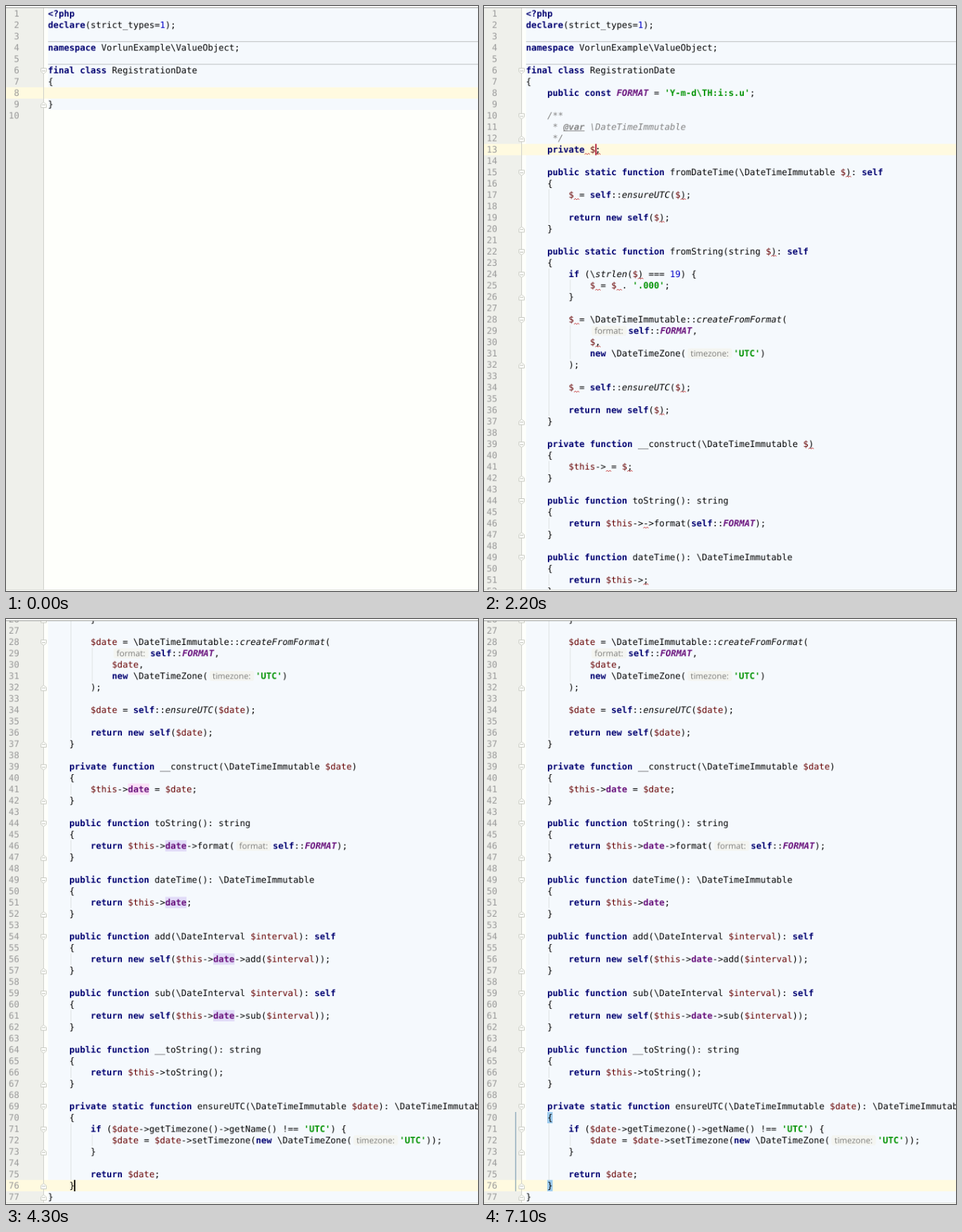
Recreate the animation shown at these times as an HTML page with a canvas. Size 672 by 833 pixels, loop 7200 ms.

```html
<!DOCTYPE html>
<html lang="en">
<head>
<meta charset="utf-8">
<title>Code template</title>
<style>
html, body { margin: 0; width: 100%; height: 100%; overflow: hidden; background: #fefffb; }
canvas { display: block; width: 672px; height: 833px; }
</style>
</head>
<body>
<canvas id="stage" width="672" height="833"></canvas>
<script>
// The editor is laid out on a whole-pixel grid and shown slightly reduced
const W = 709, H = 879, SCALE = .9486, LOOP = 7200;
const SIZE = 13.29, CHAR = 8, LINE = 17, BASE = 13, TOP = 3, LEFT = 63, SCROLL = 436;
const MONO = '"DejaVu Sans Mono", monospace';
const SANS = '"Open Sans", sans-serif';
const stage = document.getElementById('stage').getContext('2d');
const screen2x = document.createElement('canvas');
screen2x.width = W;
screen2x.height = H;
const ctx = screen2x.getContext('2d');

// ~ stands for the template variable, «...» for an inlay hint
const head = String.raw`<?php
declare(strict_types=1);

namespace VorlunExample\ValueObject;

final class RegistrationDate
{`.split('\n');

const full = head.concat(String.raw`    public const FORMAT = 'Y-m-d\TH:i:s.u';

    /**
     * @var \DateTimeImmutable
     */
    private $~;

    public static function fromDateTime(\DateTimeImmutable $~): self
    {
        $~ = self::ensureUTC($~);

        return new self($~);
    }

    public static function fromString(string $~): self
    {
        if (\strlen($~) === 19) {
            $~ = $~ . '.000';
        }

        $~ = \DateTimeImmutable::createFromFormat(
            «format:»self::FORMAT,
            $~,
            new \DateTimeZone(«timezone:»'UTC')
        );

        $~ = self::ensureUTC($~);

        return new self($~);
    }

    private function __construct(\DateTimeImmutable $~)
    {
        $this->~ = $~;
    }

    public function toString(): string
    {
        return $this->~->format(«format:»self::FORMAT);
    }

    public function dateTime(): \DateTimeImmutable
    {
        return $this->~;
    }

    public function add(\DateInterval $interval): self
    {
        return new self($this->~->add($interval));
    }

    public function sub(\DateInterval $interval): self
    {
        return new self($this->~->sub($interval));
    }

    public function __toString(): string
    {
        return $this->toString();
    }

    private static function ensureUTC(\DateTimeImmutable $~): \DateTimeImmutable
    {
        if ($~->getTimezone()->getName() !== 'UTC') {
            $~ = $~->setTimezone(new \DateTimeZone(«timezone:»'UTC'));
        }

        return $~;
    }
}
`.split('\n'));

const items = [
  ['collection', 'Collection'], ['bool', 'Bool'], ['float', 'Float'], ['int', 'Int'],
  ['string', 'String'], ['array', 'Array'], ['datetime', 'DateTimeImmutable'], ['uuid', 'UUID']
];

const styles = {
  plain: ['', '#000'],
  keyword: ['bold', '#000070'],
  string: ['bold', '#009200'],
  number: ['', '#0000c8'],
  variable: ['', '#660000'],
  field: ['bold', '#660e7a'],
  constant: ['italic bold', '#660e7a'],
  call: ['italic', '#000'],
  comment: ['italic', '#808080'],
  tag: ['italic bold', '#808080']
};

const rules = new RegExp([
  /(?<hint>«[^»]+»)/, /(?<string>'[^']*')/, /(?<tilde>\$~)/, /(?<field>~)/, /(?<variable>\$\w+)/,
  /(?<keyword><\?php|\b(?:declare|namespace|final|class|public|private|const|static|function|return|new|if|self)\b)/,
  /(?<call>(?<=::|\\)(?:ensureUTC|createFromFormat|strlen))/,
  /(?<constant>\bFORMAT\b)/, /(?<number>\b\d+\b)/
].map(r => r.source).join('|'), 'g');

function tokenize(line) {
  if (/^\s*\/?\*/.test(line)) {
    return line.split(/(@var)/).map(s => [s === '@var' ? 'tag' : 'comment', s]);
  }
  const out = [];
  let end = 0;
  for (const m of line.matchAll(rules)) {
    if (m.index > end) out.push(['plain', line.slice(end, m.index)]);
    out.push([Object.keys(m.groups).find(k => m.groups[k] !== undefined), m[0]]);
    end = m.index + m[0].length;
  }
  if (end < line.length) out.push(['plain', line.slice(end)]);
  return out;
}

// Number of edges passed at time t
const passed = (t, edges) => edges.filter(e => t >= e).length;
const indentOf = s => s.search(/\S/);

function rect(x, y, w, h, color) {
  ctx.fillStyle = color;
  ctx.fillRect(x, y, w, h);
}

function text(s, x, y, color, style = '', font = MONO, size = SIZE) {
  ctx.font = `${style} ${size}px ${font}`;
  ctx.fillStyle = color;
  ctx.fillText(s, x, y);
}

function path(points, color, close) {
  ctx.beginPath();
  points.forEach(p => ctx.lineTo(...p));
  if (close) {
    ctx.closePath();
    ctx.fillStyle = '#fefffb';
    ctx.fill();
  }
  ctx.strokeStyle = color;
  ctx.lineWidth = 1;
  ctx.stroke();
}

function squiggle(x, y) {
  const pts = [];
  for (let i = 0; i <= 4; i++) pts.push([x + i * 2, y + (i % 2 ? 1 : 3)]);
  path(pts, '#c63a3a');
}

function foldIcon(top, dir) {
  const mid = top + 9.5, flat = mid - dir * 4, side = mid + dir, tip = mid + dir * 4;
  path([[52.5, flat], [60.5, flat], [60.5, side], [56.5, tip], [52.5, side]], '#c6c8c1', true);
  rect(54, top + 9, 5, 1, '#bcbeb8');
}

function hint(label, x, top) {
  ctx.font = `12.44px ${SANS}`;
  const w = ctx.measureText(label).width + 14.4;
  ctx.fillStyle = '#f4f5f1';
  ctx.beginPath();
  ctx.roundRect(x + 2.5, top + 1, w - 5, 15, 3);
  ctx.fill();
  text(label, x + 7, top + BASE, '#7c7c7a', '', SANS, 12.44);
  return w;
}

function drawLine(line, n, top, s) {
  const base = top + BASE;
  let x = LEFT;
  const put = (str, kind) => {
    const [style, color] = styles[kind];
    text(str, x, base, color, style);
    x += str.length * CHAR;
  };
  for (const [kind, str] of tokenize(line)) {
    if (kind === 'hint') {
      const late = n === 46 && !s.done;
      if (s.parsed && !late) x += hint(str.slice(1, -1), x, top);
    } else if (kind === 'tilde' || kind === 'field') {
      const label = (kind === 'tilde' ? '$' : '') + s.name;
      const member = kind === 'field' || n === 13;
      if (member && s.done && s.usages) {
        rect(x, top, label.length * CHAR, LINE, n === 13 || n === 41 ? '#fbdff6' : '#e2dcf8');
      }
      put(label, member && s.done ? 'field' : kind === 'tilde' ? 'variable' : 'plain');
      if (s.parsed && !s.done) squiggle(x, base);
    } else {
      const semantic = kind === 'call' || kind === 'constant' || str === 'self';
      if (kind === 'tag') rect(x, base + 1, str.length * CHAR, 1, '#808080');
      put(str, semantic && s.expanded && !s.parsed ? 'plain' : kind);
      if (n === 13 && str === 'private' && s.parsed && !s.done) squiggle(x, base);
    }
  }
}

function drawGuides(lines, i, top) {
  let depth = indentOf(lines[i]);
  if (depth < 0) {
    const near = [lines[i - 1], lines[i + 1]].map(l => l === undefined ? 0 : indentOf(l));
    depth = Math.min(...near);
  }
  for (let col = 4; col + 4 <= depth; col += 4) {
    rect(LEFT + col * CHAR + 2, top, 1, LINE, '#dfe2e3');
  }
}

function drawPopup(prefix) {
  const rows = items.filter(([key]) => ('vo_' + key).startsWith(prefix));
  const x = 84, y = 138, w = 519, row = 19, listH = rows.length * row, h = listH + row;
  const rowW = rows.length > 1 ? 504 : w;
  const nameX = LEFT + 4 * CHAR, link = '#3f78b4';
  ctx.save();
  ctx.shadowColor = 'rgba(0,0,0,.35)';
  ctx.shadowBlur = 3;
  ctx.shadowOffsetY = 1;
  rect(x, y, w, h, '#f0f1ee');
  ctx.restore();
  rect(x, y, rowW, listH + 1, '#ebf3fc');
  rect(x, y, rowW, row + 1, '#a2b5c1');
  rows.forEach(([key, label], i) => {
    const base = y + 15 + i * row, name = 'vo_' + key, desc = label + ' value object';
    text(prefix, nameX, base, '#b04cc0');
    text(name.slice(prefix.length), nameX + prefix.length * CHAR, base, '#56595c');
    text(desc, 582 - desc.length * CHAR, base, '#56595c');
  });
  const foot = y + listH, base = foot + 15;
  text('Strg+Unten and Strg+Oben will move caret down and up in the editor', 90, base, '#111', '', SANS, 12.55);
  text('>>', 500.5, base, link, '', SANS, 12.55);
  rect(501, base + 2, 14, 1, link);
  rect(588, foot + 2, 15, 16, '#cfd8df');
  rect(589, foot + 3, 13, 14, '#eaf2f9');
  text('π', 591, base, link, '', MONO, 14);
  ctx.strokeStyle = '#a9adae';
  ctx.lineWidth = 1;
  ctx.strokeRect(x + .5, y + .5, w - 1, h - 1);
}

function draw(t) {
  const typed = 'vo_d'.slice(0, passed(t, [700, 800, 1000, 1200]));
  const s = {
    expanded: t >= 2000,
    parsed: t >= 2200,
    done: t >= 3900,
    usages: t < 4600,
    name: 'date'.slice(0, passed(t, [3500, 3600, 3700, 3800]))
  };
  const jumped = t >= 4300, matched = t >= 4400;
  const lines = s.expanded ? full : head.concat('    ' + typed, '}', '');
  const scroll = jumped ? SCROLL : 0;
  const topOf = n => TOP + (n - 1) * LINE - scroll;
  const active = jumped ? 76 : s.expanded ? 13 : 8;
  const activeY = topOf(active);

  rect(0, 0, W, H, '#fefffb');
  ctx.save();
  ctx.beginPath();
  ctx.rect(0, 3, W, 873);
  ctx.clip();

  rect(0, 0, 56, H, '#eff0eb');
  rect(LEFT, 0, W - LEFT, topOf(lines.length), '#f5f9fd');
  rect(0, activeY, W, LINE, '#fffae0');
  rect(56, 0, 1, H, '#cbccc7');
  for (const n of [4, 6]) rect(LEFT, topOf(n) - 1, W - LEFT, 1, '#b9bcbd');

  if (matched) {
    rect(47, topOf(70), 1, 7 * LINE, '#6087a4');
    for (const n of [70, 76]) rect(LEFT + 4 * CHAR, topOf(n), CHAR, LINE, '#9ccbee');
  }

  lines.forEach((line, i) => {
    const n = i + 1, top = topOf(n);
    if (top < -LINE || top > H) return;
    const label = String(n);
    text(label, 20 - label.length * CHAR, top + BASE, '#999');
    if (s.expanded) drawGuides(lines, i, top);
    drawLine(line, n, top, s);
    if (s.parsed || n === 6 || !s.expanded) {
      if (/^final|function|\/\*\*|if \(|\($/.test(line)) foldIcon(top, 1);
      else if (/^\s*(\}|\);|\*\/)/.test(line)) foldIcon(top, -1);
    }
  });

  // Editable field of the template
  if (s.expanded && !jumped) {
    ctx.strokeStyle = '#b0183a';
    ctx.lineWidth = 1;
    ctx.strokeRect(LEFT + 13 * CHAR + .5, activeY + .5, Math.max(1, s.name.length * CHAR), LINE - 1);
  }

  const blink = [400, 2200, 3300, 3900, 4100, 5200, 5800, 6200, 6700, 7100];
  if (passed(t, blink) % 2) {
    const col = jumped ? 5 : s.expanded ? 13 + s.name.length : 4 + typed.length;
    rect(LEFT + col * CHAR - 1, activeY, 2, LINE, '#000');
  }
  if (t >= 800 && t < 1800) drawPopup(typed);
  ctx.restore();

  rect(0, 2, W, 1, '#9b9c9a');
  rect(0, 876, W, 1, '#d9dad6');
  stage.drawImage(screen2x, 0, 0, W * SCALE, H * SCALE);
}

ctx.textBaseline = 'alphabetic';
ctx.textRendering = 'geometricPrecision';
stage.imageSmoothingQuality = 'high';
const start = performance.now();
function tick() {
  draw((performance.now() - start) % LOOP);
  requestAnimationFrame(tick);
}
tick();
</script>
</body>
</html>
```
